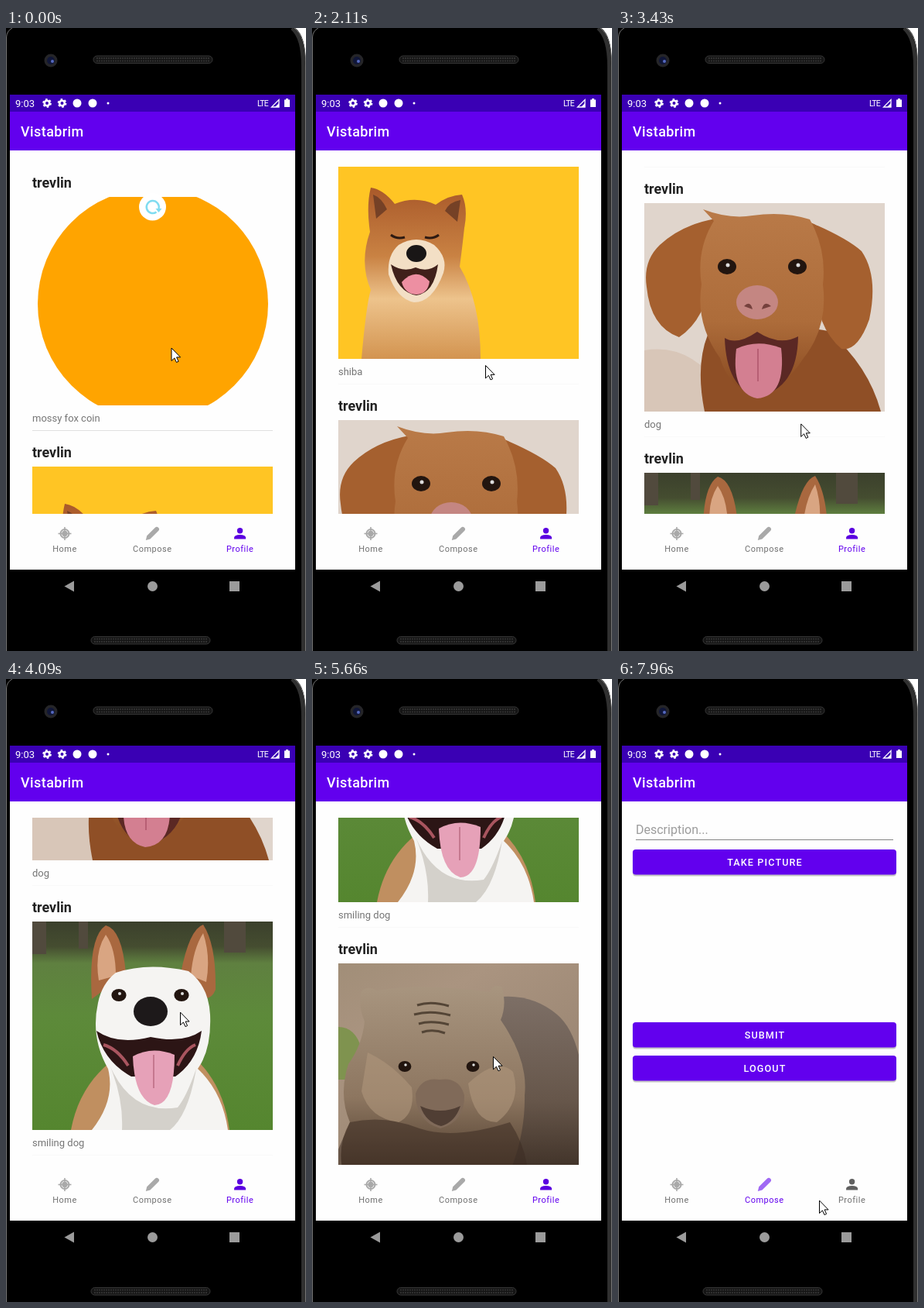
Recreate the animation shown at these times as an HTML page. Size 388 px wide and 804 px high, loop 8 s.

```html
<!DOCTYPE html>
<html lang="en">
<head>
<meta charset="utf-8">
<title>Photo feed</title>
<style>
html, body { margin: 0; width: 100%; height: 100%; overflow: hidden; background: #fff; }
svg { display: block; }
#stage { width: 388px; height: 804px; }
text { font-family: Roboto, sans-serif; }
.user { font-size: 18px; font-weight: 700; fill: #212121; }
.caption { font-size: 13px; fill: #757575; }
.tab text { font-size: 11px; letter-spacing: .5px; text-anchor: middle; fill: #707070; }
.tab .icon { color: #a9a9a9; }
.tab.on text { fill: #6200ee; }
.tab.on .icon { color: #5a00e0; }
#tab1.on .icon { color: #a069f4; }
#tab2:not(.on) .icon { color: #606060; }
.button { font-size: 12.6px; font-weight: 500; letter-spacing: 1.12px; text-anchor: middle; fill: #fff; }
</style>
</head>
<body>
<svg id="stage" viewBox="0 0 388 804">
  <defs>
    <linearGradient id="shibaFur" x2="0" y2="1"><stop stop-color="#a9592a"/><stop offset=".4" stop-color="#c98243"/><stop offset=".65" stop-color="#edc38c"/><stop offset="1" stop-color="#d39450"/></linearGradient>
    <linearGradient id="goldenFur" x2="0" y2="1"><stop stop-color="#b97a48"/><stop offset=".6" stop-color="#ad6c3a"/><stop offset="1" stop-color="#85471f"/></linearGradient>
    <linearGradient id="lawn" x2="0" y2="1"><stop stop-color="#3b402c"/><stop offset=".12" stop-color="#454d30"/><stop offset=".2" stop-color="#5f8040"/><stop offset=".45" stop-color="#5d8a3a"/><stop offset="1" stop-color="#55862f"/></linearGradient>
    <linearGradient id="wombatFur" x2="0" y2="1"><stop stop-color="#a8957f"/><stop offset=".6" stop-color="#8d7660"/><stop offset="1" stop-color="#4d3b2c"/></linearGradient>
    <linearGradient id="wombatBack" x2="0" y2="1"><stop stop-color="#7d6f66"/><stop offset=".6" stop-color="#66564a"/><stop offset="1" stop-color="#3f3127"/></linearGradient>
    <linearGradient id="dirt" x2=".7" y2="1"><stop stop-color="#a18e78"/><stop offset=".3" stop-color="#aa9480"/><stop offset="1" stop-color="#94806d"/></linearGradient>
  </defs>

  <!-- phone body -->
  <path d="M0 0H374Q387.500 10 387.500 44V804H0Z" fill="#000"/>
  <path d="M370 0Q384.500 12 384.500 50V804" fill="none" stroke="#303030" stroke-width="5"/>
  <path d="M373 0Q387.500 11 387.500 46V804M.5 804V12Q1 4 8 0" fill="none" stroke="#777"/>
  <circle cx="58" cy="42" r="8.500" fill="#252528"/>
  <circle cx="58" cy="42" r="5" fill="#101638"/>
  <circle cx="60" cy="43" r="2" fill="#566ac0"/>
  <g id="grilles"></g>

  <!-- screen -->
  <rect x="5" y="86" width="369" height="613" fill="#fefefe"/>
  <rect x="5" y="86" width="369" height="22" fill="#3a00b4"/>
  <rect x="5" y="108" width="369" height="50" fill="#6200ee"/>
  <g fill="#fff">
    <text x="12" y="102" font-size="13">9:03</text>
    <g id="gears" fill="none" stroke="#fff"></g>
    <circle cx="92" cy="97" r="5.500"/><circle cx="112" cy="97" r="5.500"/><circle cx="132" cy="97" r="1.500"/>
    <text x="325" y="100.500" font-size="10.500" letter-spacing="-.9">LTE</text>
    <path d="M343.500 102H353V92.500Z" fill="none" stroke="#fff" stroke-width="1.300"/>
    <path d="M348 102H353V97Z"/>
    <path d="M360 92.500H362V91H365V92.500H367V102H360Z"/>
    <text x="19" y="140" font-size="18" font-weight="500" letter-spacing=".4">Vistabrim</text>
  </g>

  <g id="profile">
    <svg x="34" y="179" width="311" height="448"><g id="feed"></g></svg>
    <svg x="34" y="179" width="311" height="448">
      <g id="spinner">
        <circle r="17.500" fill="#fff"/>
        <path d="M5 6.500A8 8 0 1 1 8 2" fill="none" stroke="#80dcf0" stroke-width="2.500"/>
        <path d="M4 2H12L8 7Z" fill="#80dcf0"/>
      </g>
    </svg>
  </g>

  <g id="compose">
    <text x="23" y="199.500" font-size="16" fill="#9c9c9c">Description...</text>
    <path d="M23 207.500H356" stroke="#858585"/>
    <g id="buttons"></g>
  </g>

  <g id="tabs"></g>
  <g fill="#9b9b9b"><path d="M75.500 720.500L88 713.500V727.500Z"/><circle cx="189.500" cy="720.500" r="6.500"/><rect x="289" y="714" width="13" height="13"/></g>
  <path id="cursor" d="M0 0V16.500L3.900 12.900L6.500 18.500L9.100 17.300L6.600 11.900H11.600Z" fill="#fff" stroke="#000"/>
</svg>

<script>
const $ = id => document.getElementById(id);
const PITCH = 348, LOOP = 8000;

const eyes = (x1, x2, y, r) => [x1, x2].map(x =>
  `<ellipse cx="${x}" cy="${y}" rx="${r * 1.2}" ry="${r}" fill="#22150f"/><circle cx="${x + 1}" cy="${y - 2}" r="${r / 4}" fill="#ddd"/>`).join('');

const coin = `<circle cx="156" cy="138" r="149" fill="#ffa400"/>`;

const shiba = `<rect width="311" height="269" fill="#ffc524"/>
  <path d="M42 48Q58 50 73 69Q100 58 126 70Q142 58 160 57Q168 75 163 100Q160 128 157 150Q184 195 184 269H30Q36 200 42 180Q27 145 41 105Q36 72 42 48Z" fill="url(#shibaFur)"/>
  <path d="M45 57Q56 61 63 76L49 88ZM158 64Q144 66 138 78L154 92Z" fill="#754126"/>
  <path d="M78 122Q101 108 124 122Q142 138 136 158Q122 196 98 196Q76 192 65 160Q63 135 78 122Z" fill="#f3dfc5"/>
  <path d="M68 147Q84 158 100 151Q116 158 129 147Q124 184 101 187Q76 183 68 147Z" fill="#40201a"/>
  <path d="M82 170Q100 150 118 169Q116 185 101 186Q86 185 82 170Z" fill="#ed8fa2"/>
  <ellipse cx="101" cy="133" rx="13" ry="11" fill="#191616"/>
  <path d="M68 109Q76 115 86 112M112 112Q122 115 130 109" fill="none" stroke="#2d1a12" stroke-width="3"/>`;

const golden = `<rect width="311" height="269" fill="#e0d5cc"/>
  <path d="M0 190Q60 180 100 240V269H0Z" fill="#d8c6b8"/>
  <path d="M82 170Q150 150 238 165Q290 210 306 269H78Q66 210 82 170Z" fill="#8f4f26"/>
  <path d="M92 20Q48 28 20 54Q-2 75 3 108Q8 160 45 173Q80 150 88 90ZM215 25Q262 45 281 62Q303 94 291 150Q276 192 255 188Q222 160 220 100Z" fill="#a5602f"/>
  <path d="M76 8Q110 21 140 16Q180 10 214 21Q236 60 231 105Q238 160 206 200Q180 240 146 250Q109 238 98 200Q66 156 74 105Q67 60 90 23Z" fill="url(#goldenFur)"/>
  <path d="M104 174Q120 184 146 166Q175 185 199 172Q198 240 146 250Q106 238 104 174Z" fill="#5b2824"/>
  <path d="M119 188Q146 175 177 187Q184 249 146 252Q112 245 119 188Z" fill="#d37f91"/>
  <path d="M147 188V230" stroke="#b75f74" stroke-width="2"/>
  <ellipse cx="146" cy="128" rx="27" ry="22" fill="#c48682"/>
  <path d="M129 133Q137 125 140 137M164 133Q155 125 152 137" fill="#75413d"/>
  ${eyes(107, 198, 82, 10)}`;

const white = `<rect width="311" height="269" fill="url(#lawn)"/>
  <path d="M0 0H18V42H0M60 0H72V35H60M248 0H276V40H248" fill="#514a3d"/>
  <path d="M50 269Q60 215 100 182H216Q248 215 255 269Z" fill="#c08f60"/>
  <path d="M77 100Q72 20 95 5Q116 10 121 67ZM192 67Q203 10 221 4Q238 30 237 88Q230 105 215 95Z" fill="#a9683f"/>
  <path d="M86 76Q80 40 95 17Q108 35 108 70ZM205 70Q208 35 221 15Q231 45 225 78Z" fill="#d9a582"/>
  <path d="M108 66Q150 52 202 64Q228 83 230 120Q232 165 214 190Q246 220 253 269H77Q108 230 98 190Q75 150 85 105Q90 80 108 66Z" fill="#f5f4f2"/>
  <path d="M100 185Q128 250 188 240Q200 225 212 190Q202 250 178 269H116Q118 228 100 185Z" fill="#d4d1cb"/>
  <path d="M83 141Q110 160 153 149Q195 158 219 141Q214 180 185 200H128Q92 180 83 141Z" fill="#2c1515"/>
  <path d="M92 159Q110 164 124 186M211 159Q198 164 188 186" fill="none" stroke="#a9555f" stroke-width="4"/>
  <path d="M130 174Q155 160 184 172Q184 236 158 237Q132 229 130 174Z" fill="#e6a1b8"/>
  <path d="M157 172V215" stroke="#c5788f" stroke-width="2"/>
  <ellipse cx="153" cy="116" rx="22" ry="19" fill="#1d191a"/>
  ${eyes(112, 193, 95, 8)}`;

const wombat = `<rect width="311" height="269" fill="url(#dirt)"/>
  <path d="M0 82Q22 82 30 110L10 150H0Z" fill="#7f934f"/>
  <path d="M190 46Q245 34 283 66Q302 82 311 118V269H160Z" fill="url(#wombatBack)"/>
  <path d="M30 36Q38 28 50 35Q110 25 196 37Q201 25 212 31Q218 54 210 73Q246 125 241 170Q242 220 222 269H6Q-2 235 15 205Q0 170 13 130Q31 105 34 75Q25 54 30 36Z" fill="url(#wombatFur)"/>
  <path d="M38 115Q70 130 95 160Q100 195 78 205Q40 200 30 165ZM168 155Q205 120 226 140Q238 180 205 205Q175 205 168 155Z" fill="#b0977c" opacity=".6"/>
  <path d="M15 205Q60 195 105 213Q150 228 222 205Q242 235 245 269H0V240Z" fill="#3c2d23" opacity=".55"/>
  <path d="M102 54Q120 48 143 55M98 66Q120 60 145 67M104 78Q120 73 143 79M108 89Q122 84 138 90" fill="none" stroke="#544536" stroke-width="3"/>
  <path d="M100 168Q108 146 131 150Q156 146 163 170Q164 204 132 213Q100 204 100 168Z" fill="#806a59"/>
  <path d="M106 184Q132 196 158 184Q151 205 133 210Q113 205 106 184Z" fill="#503e34"/>
  ${eyes(86, 174, 133, 7)}`;

const posts = [[coin, 'mossy fox coin'], [shiba, 'shiba'], [golden, 'dog'], [white, 'smiling dog'], [wombat, 'wombat']];
$('feed').innerHTML = posts.map(([photo, caption], i) => `<g transform="translate(0 ${i * PITCH})">
  <text class="user" y="26.500">trevlin</text>
  <svg y="39" width="311" height="269">${photo}</svg>
  <text class="caption" y="329">${caption}</text>
  <path class="divider" d="M0 340.500H311" stroke="#e0e0e0"/></g>`).join('');

$('grilles').innerHTML = [[113, 36], [110, 785.5]].map(([x, y]) =>
  `<rect x="${x}" y="${y}" width="154" height="9.500" rx="4.700" fill="#151515" stroke="#383838"/>` +
  [3, 6.5].map(dy => `<path d="M${x + 4} ${y + dy}h146" stroke="#303030" stroke-width="2" stroke-dasharray="2 1"/>`).join('')).join('');

$('gears').innerHTML = [53, 72.5].map(x =>
  `<circle cx="${x}" cy="97" r="3.300" stroke-width="2.600"/><circle cx="${x}" cy="97" r="5" stroke-width="1.800" stroke-dasharray="2.600 2.636"/>`).join('');

$('buttons').innerHTML = [[220, 'TAKE PICTURE'], [443, 'SUBMIT'], [486, 'LOGOUT']].map(([y, label]) =>
  `<rect x="19" y="${y + 1.5}" width="341" height="33" rx="4" opacity=".22"/>
   <rect x="19" y="${y}" width="341" height="32.500" rx="4" fill="#6200ee"/>
   <text class="button" x="190" y="${y + 21}">${label}</text>`).join('');

const icons = [
  `<g fill="none" stroke="currentColor"><circle r="5.500" stroke-width="2"/><path d="M0-8.500V8.500M-8.500 0H8.500" stroke-width="1.600"/></g><circle r="3.700" fill="currentColor"/>`,
  `<path transform="rotate(45)" d="M-3-8Q-3-11 0-11Q3-11 3-8V7L0 12L-3 7Z" fill="currentColor"/>`,
  `<path d="M-7.500 7V5Q-7 1.500 0 1.500Q7 1.500 7.500 5V7Z" fill="currentColor"/><circle cy="-3.700" r="3.700" fill="currentColor"/>`];
$('tabs').innerHTML = ['Home', 'Compose', 'Profile'].map((label, i) => `<g class="tab" id="tab${i}" transform="translate(${76 + i * 113.3} 652.5)">
  <g class="icon">${icons[i]}</g><text y="23.500">${label}</text></g>`).join('');

// Screen refresh times: runs of [first, last, count]
const refreshes = [[0, 0, 1], [120, 660, 5], [940, 1960, 9], [2110, 3040, 8], [3190, 4210, 9], [4360, 4360, 1],
  [4820, 5780, 8], [6750, 7720, 7], [7840, 7960, 2]]
  .flatMap(([a, b, n]) => Array.from({ length: n }, (_, i) => a + (b - a) * i / Math.max(1, n - 1)));

// time, feed scroll, cursor x, cursor y
const keys = [
  [0, 0, 214, 413], [660, 0, 216, 550], [820, 0, 216, 550], [1450, 210, 222, 340], [1960, 385, 223, 400],
  [2110, 408, 224.5, 435.5], [2400, 450, 232, 535], [2920, 681, 238, 425], [3040, 682, 239, 430],
  [3400, 690, 236, 535], [4082, 949, 225.5, 430], [4360, 955, 228, 490], [4700, 955, 230, 520],
  [5094, 1105, 232.5, 396.5], [5780, 1278, 235, 510], [6620, 1278, 235, 510], [6750, 1278, 235.5, 533],
  [7300, 1278, 196, 655], [7720, 1278, 206, 655], [7960, 1278, 260.5, 673]];

function pose(t) {
  const i = Math.max(1, keys.findIndex(k => k[0] >= t));
  const [a, b] = [keys[i - 1], keys[i]];
  const p = (t - a[0]) / (b[0] - a[0]);
  return a.map((v, j) => v + (b[j] - v) * p).slice(1);
}

function draw(now) {
  const time = now % LOOP;
  const t = refreshes.findLast(r => r <= time + 8);
  const [scroll, x, y] = pose(t);
  const moving = scroll - pose(Math.max(0, t - 100))[0] > 2;
  const composing = t > 7400;
  $('feed').setAttribute('transform', `translate(0 ${-Math.round(scroll)})`);
  document.querySelectorAll('.divider').forEach(d => d.style.opacity = moving ? .15 : 1);
  const pull = Math.min(1, t / 520);
  $('spinner').setAttribute('transform', `translate(155.5 ${52 - 75 * pull}) rotate(${-150 * pull})`);
  $('cursor').setAttribute('transform', `translate(${x} ${y})`);
  $('profile').style.display = composing ? 'none' : '';
  $('compose').style.display = composing ? '' : 'none';
  $('tab1').classList.toggle('on', composing);
  $('tab2').classList.toggle('on', !composing);
}

const start = performance.now();
(function tick() {
  draw(performance.now() - start);
  requestAnimationFrame(tick);
})();
</script>
</body>
</html>
```
